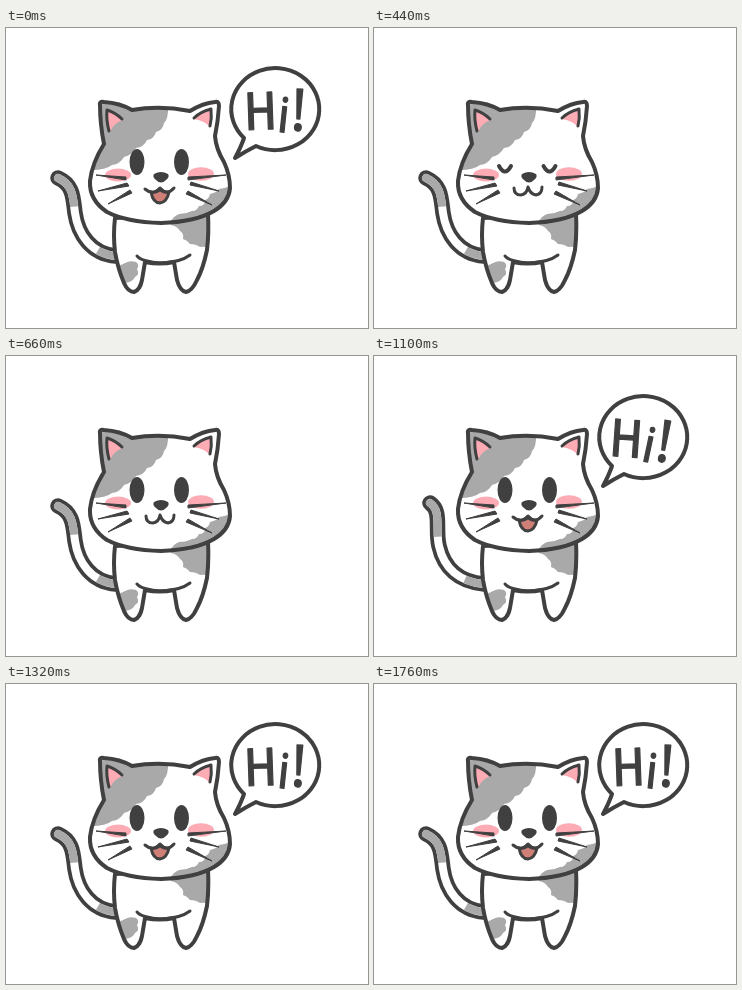
An HTML page for the animation above (1.98 s loop, 362x300 px).

```html
<!DOCTYPE html>
<html lang="en">
<head>
<meta charset="utf-8">
<title>Waving cat</title>
<style>
  html, body { margin: 0; width: 100%; height: 100%; overflow: hidden; background: #fff; }
  svg { display: block; width: 100vw; height: 100vh; }
  .line { fill: none; stroke: #404041; stroke-width: 4; stroke-linecap: round; stroke-linejoin: round; }
  .thin { stroke-width: 3; }
  .white { fill: #fff; }
  .grey { fill: #a9a9aa; }
  .pink { fill: #fdabb4; }
  .dark { fill: #404041; }
  .tail { fill: none; stroke-linecap: round; }
  .whisker { fill: #404041; stroke: #404041; stroke-width: 1; stroke-linejoin: round; }
  text { font: 400 48px "Open Sans", sans-serif; fill: #404041; stroke: #404041; stroke-width: 1.2; stroke-linejoin: round; }
  .cap { font: 400 52px "Noto Sans Mono", monospace; }
  .bang { font-size: 58px; }
</style>
</head>
<body>
<svg viewBox="0 0 362 300">
  <defs>
    <path id="head" d="M94 77Q93 73 98 74Q114 75 126 82Q154 77 184 83Q197 75 209 74Q213 73 213 78Q212 94 209 108Q210 121 218 134Q224 147 224 160Q223 174 208 183Q189 194 155 195Q120 194 101 184Q83 172 84 153Q86 135 98 116Q94 96 94 77Z"/>
    <path id="body" d="M109 190Q107 207 109 224Q112 241 118 255Q122 264 128 264Q134 262 136 252L139 234Q154 237 168 234L171 252Q174 263 180 264Q186 263 191 252Q197 241 201 222Q203 205 202 186Z"/>
    <clipPath id="inHead"><use href="#head"/></clipPath>
    <clipPath id="inBody"><use href="#body"/></clipPath>
  </defs>

  <g id="tail">
    <path class="tail" stroke="#404041" stroke-width="15.5"/>
    <path class="tail" stroke="#fff" stroke-width="8"/>
    <path class="tail" stroke="#a9a9aa" stroke-width="8" pathLength="100" stroke-dasharray="33 49 18 10" style="stroke-linecap:butt"/>
    <path class="tail" stroke="#a9a9aa" stroke-width="8" pathLength="100" stroke-dasharray="0.1 200"/>
  </g>

  <use href="#body" class="white"/>
  <g clip-path="url(#inBody)" class="grey">
    <path d="M108 237Q115 238 119 235Q124 232 130 234Q134 237 131 241Q134 246 129 249Q127 254 119 255H110Z"/>
    <path d="M208 184H160Q161 194 165 197Q171 198 174 203Q178 205 177 211Q181 212 184 216Q190 216 194 219Q199 218 206 221Z"/>
  </g>
  <use href="#body" class="line"/>
  <path class="line thin" d="M131 228Q136 234 156 235Q175 234 184 227"/>

  <use href="#head" class="white"/>
  <g clip-path="url(#inHead)">
    <path class="grey" d="M80 65H160L162 82Q162 91 158 95Q157 102 150 104Q148 111 141 112Q138 119 130 120Q126 127 118 129Q114 136 106 137Q99 143 80 142Z"/>
    <path class="grey" d="M232 154Q222 160 213 161Q210 165 204 166Q203 171 199 172Q199 178 193 178Q191 183 186 183Q180 186 173 186Q165 189 163 199H232Z"/>
  </g>
  <ellipse class="pink" cx="112" cy="147" rx="13" ry="6.5"/>
  <ellipse class="pink" cx="195" cy="146" rx="13" ry="6.8"/>
  <path class="pink" d="M101 82Q110 85 116 92Q107 96 104 104Q101 92 101 82ZM205 81Q194 84 188 91Q199 93 204 99Q206 90 205 81Z"/>
  <path class="line thin" d="M103 103Q100 92 101 82Q110 85 116 91M188 90Q194 84 205 81Q206 90 204 98"/>
  <use href="#head" class="line"/>

  <path class="whisker" d="M90 147L120 149V152ZM92 163L121 155L123 158ZM102 176L124 162L126 165ZM220 147L182 149V152ZM213 163L184 157L185 154ZM206 177L180 166L182 163Z"/>
  <g id="openEyes" class="dark">
    <ellipse cx="131" cy="134" rx="7.5" ry="13"/>
    <ellipse cx="175.5" cy="134" rx="7.5" ry="13"/>
  </g>
  <path id="shutEyes" class="line" d="M125 138Q131 149 137 138M169.500 138Q175.500 149 181.500 138"/>
  <g id="openMouth">
    <path class="line thin" style="fill:#cf7f78" d="M145 164Q147 175 154 175Q161 174 163 164Q157 165 154 161Q151 165 145 164Z"/>
    <path class="line thin" d="M139 161Q147 168 154 160Q161 168 168 160"/>
  </g>
  <path id="shutMouth" class="line thin" d="M140 160Q140 167 147 167Q153 166 154 159Q156 166 162 167Q168 166 168 159"/>
  <path class="dark" d="M148 146Q155 142 162 146Q164 149 160 152Q155 157 150 152Q146 149 148 146Z"/>

  <g id="bubble">
    <path class="line" style="fill:#fff" d="M238 110A44 41 0 1 1 250 118Q240 123 229 130Q235 119 238 110Z"/>
    <text id="hi" rotate="-2 6 3"><tspan class="cap" x="239.500" y="102">H</tspan><tspan x="270" y="103.500">i</tspan><tspan class="bang" x="284" y="102">!</tspan></text>
  </g>
</svg>
<script>
  const STEP = 220, STEPS = 9;
  const $ = id => document.getElementById(id);
  const show = (id, on) => $(id).setAttribute("visibility", on ? "visible" : "hidden");
  const restTail = "M52 150C68 157 67 171 69 185C72 206 85 226 110 228";
  const wagTail = "M56 147C68 155 61 173 65 190C70 212 85 226 110 228";

  function draw(ms) {
    const step = Math.floor(ms / STEP) % STEPS;
    const greeting = step === 0 || step >= 4;
    const wag = step === 5 || step === 7;
    const blink = step === 2;
    show("bubble", greeting);
    show("openMouth", greeting);
    show("shutMouth", !greeting);
    show("openEyes", !blink);
    show("shutEyes", blink);
    for (const part of $("tail").children) part.setAttribute("d", wag ? wagTail : restTail);
    $("hi").setAttribute("transform", wag ? "translate(-2 1) rotate(6 270 82)" : "");
  }

  const start = performance.now();
  function tick() {
    draw(performance.now() - start);
    requestAnimationFrame(tick);
  }
  draw(0);
  tick();
</script>
</body>
</html>
```
